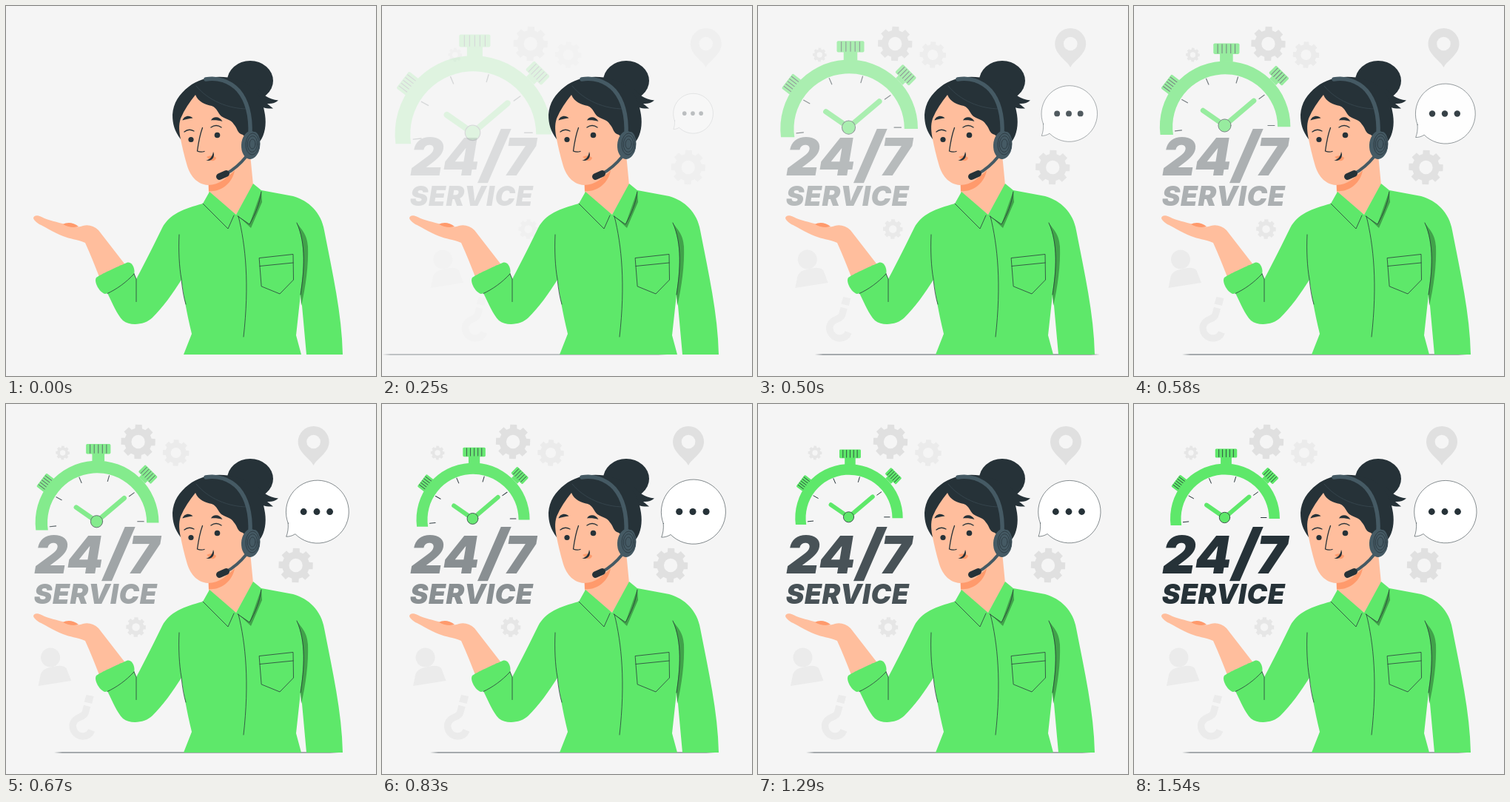
Write an HTML page with a canvas that moves like this. It is 500 by 500 pixels and loops after 1620 ms.

```html
<!DOCTYPE html>
<html lang="en">
<head>
<meta charset="utf-8">
<title>24/7 service</title>
<style>
html, body { margin: 0; width: 100%; height: 100%; overflow: hidden; background: #f5f5f5; }
canvas { display: block; }
</style>
</head>
<body>
<canvas id="stage" width="500" height="500"></canvas>
<script>
const LOOP = 1620, TAU = Math.PI * 2;
const BG = '#f5f5f5', GREEN = '#5ee86a', SHADE = '#41a24a', DARK = '#263238',
  STEEL = '#455a64', SKIN = '#ffbe9d', BLUSH = '#ff9a6c', GREY = '#e0e0e0', PALE = '#ebebeb';

const stage = document.getElementById('stage').getContext('2d');
const makeLayer = () => {
  const canvas = document.createElement('canvas');
  canvas.width = canvas.height = 500;
  return canvas.getContext('2d');
};
const layer = makeLayer(), portrait = makeLayer();
let ctx = stage;

const clamp = v => Math.max(0, Math.min(1, v));

// Cubic bezier timing with a soft overshoot.
function ease(x) {
  x = clamp(x);
  const curve = (u, a, b) => 3 * (1 - u) ** 2 * u * a + 3 * (1 - u) * u * u * b + u ** 3;
  let lo = 0, hi = 1;
  for (let i = 0; i < 24; i++) {
    const mid = (lo + hi) / 2;
    if (curve(mid, 0.36, 0.5) < x) lo = mid; else hi = mid;
  }
  return curve((lo + hi) / 2, -0.01, 1.38);
}

function fill(d, color) {
  ctx.fillStyle = color;
  ctx.fill(new Path2D(d));
}

function stroke(d, color = DARK, width = 0.75, cap = 'round') {
  ctx.strokeStyle = color;
  ctx.lineWidth = width;
  ctx.lineCap = cap;
  ctx.lineJoin = 'round';
  ctx.stroke(new Path2D(d));
}

function oval(x, y, rx, ry, color, turn = 0) {
  ctx.beginPath();
  ctx.ellipse(x, y, rx, ry, turn, 0, TAU);
  ctx.fillStyle = color;
  ctx.fill();
}

const dot = (x, y, r, color) => oval(x, y, r, r, color);

// Paints a group on its own layer so that overlaps fade as one.
function fadeGroup(alpha, paint) {
  if (alpha <= 0) return;
  ctx = layer;
  ctx.clearRect(0, 0, 500, 500);
  ctx.save();
  paint();
  ctx.restore();
  ctx = stage;
  ctx.globalAlpha = clamp(alpha);
  ctx.drawImage(layer.canvas, 0, 0);
  ctx.globalAlpha = 1;
}

function scaleAbout(x, y, s) {
  ctx.translate(x, y);
  ctx.scale(s, s);
  ctx.translate(-x, -y);
}

function gear(x, y, r, color, turn = 0.03) {
  ctx.beginPath();
  for (let i = 0; i < 8; i++) {
    const a = turn + i * TAU / 8;
    for (const [da, k] of [[-0.26, 0.79], [-0.19, 1], [0.19, 1], [0.26, 0.79]])
      ctx.lineTo(x + r * k * Math.cos(a + da), y + r * k * Math.sin(a + da));
  }
  ctx.closePath();
  ctx.moveTo(x + r * 0.39, y);
  ctx.arc(x, y, r * 0.39, 0, TAU);
  ctx.fillStyle = color;
  ctx.fill('evenodd');
}

function drawIcons() {
  gear(179, 51, 23.5, GREY);
  gear(230, 66, 18, PALE);
  gear(77, 66, 9.5, '#e6e6e6');
  gear(392, 218, 23.5, GREY);
  gear(176, 301.5, 13.5, '#e6e6e6');
  fill('M416 83C411 73 395 66 395 51A21 21 0 0 1 437 51C437 66 421 73 416 83Z', GREY);
  dot(416, 51, 9.3, BG);
  dot(60.5, 342.5, 13, PALE);
  fill('M44 381L47 366C49 359 55 357 60 356C68 354 77 352 82 357L88.5 374Z', PALE);
  fill('M109 393L119 395L116.500 405L106 402.500Z', PALE);
  stroke('M110 408L107.500 417C106 423 99 422 94 427C86 435 93 449 104 449C110 449 114 446 116 441', PALE, 9.5, 'butt');
}

function drawBubble() {
  const d = 'M381.500 161A42.200 42.200 0 1 1 391 175.500C387 178 383 179 379 179C381 174 382 168 381.500 161Z';
  fill(d, '#fff');
  stroke(d, DARK, 0.55);
  for (const x of [402.3, 420, 437.5]) dot(x, 145.5, 4.4, DARK);
}

function crown(x, y, w, h, turn, stem = 0) {
  ctx.save();
  ctx.translate(x, y);
  ctx.rotate(turn);
  ctx.fillStyle = GREEN;
  ctx.fillRect(-w / 4, h / 2 - 1, w / 2, stem + 1);
  ctx.beginPath();
  ctx.roundRect(-w / 2, -h / 2, w, h, 1.5);
  ctx.fill();
  for (let i = -2; i <= 2; i++) stroke(`M${i * w / 6} ${-h / 2 + 1}V${h / 2 - 1}`, DARK, 0.8);
  ctx.restore();
}

function drawStopwatch() {
  crown(124.5, 66.5, 29.5, 12, 0, 9);
  crown(61, 107, 20, 12, -0.92, 2);
  crown(184, 97, 21, 12, 0.78, 4);
  fill('M49.600 164A74 74 0 1 1 197 155H182.500A59.500 59.500 0 1 0 64.200 164Z', GREEN);
  for (let i = 0; i < 6; i++) {
    const a = -i * 0.65, c = Math.cos(a), s = Math.sin(a);
    stroke(`M${122.5 + 49 * c} ${153.5 + 50 * s}L${122.5 + 56.5 * c} ${153.5 + 57 * s}`, DARK, 1);
  }
  stroke('M98 136.500L122.500 153.500L155.500 125.500', GREEN, 5.8);
  dot(122.5, 153.5, 7.2, GREEN);
  ctx.beginPath();
  ctx.arc(122.5, 153.5, 7.2, 0, TAU);
  ctx.strokeStyle = DARK;
  ctx.lineWidth = 0.8;
  ctx.stroke();
}

function label(text, x, y, size, spacing = 0) {
  ctx.font = `italic 900 ${size}px Inter, "Open Sans", sans-serif`;
  ctx.letterSpacing = spacing + 'px';
  ctx.textAlign = 'center';
  ctx.fillStyle = DARK;
  ctx.fillText(text, x, y);
}

function drawText() {
  label('24', 85, 228.5, 70);
  label('/', 151, 230, 84);
  label('7', 186, 228.5, 70);
  label('SERVICE', 121, 270, 37, 0.6);
}

function drawArm() {
  fill('M37 287C37 283 42 282 48 285C57 290 70 292 80 295C90 300 98 299 104 297C111 295 119 297 125 303L163 352L126 366C120 351 114 335 107 320C95 315 87 315 77 311C64 306 52 298 45 295C41 292 38 290 37 287Z', SKIN);
  fill('M77 295C82 292 91 292 98 298C92 300 84 299 77 295Z', BLUSH);
}

function drawShirt() {
  fill('M266 267C240 274 221 281 211 300C200 322 190 343 176 369L172 358L135 380L137 388C144 402 150 417 158 425C168 433 188 431 198 421C212 407 225 389 237 370C240 390 244 414 251 443L240 471H399L392 445L398 390L400 405L406 471H455C454 416 441 360 430 303C426 279 409 263 388 257L345 249L334 240L311 282L275 251Z', GREEN);
  fill('M122 367C127 363 151 352 163 347C171 344 175 357 173 362C165 374 145 387 134 389C127 388 118 373 122 367Z', GREEN);
  fill('M393 293C399 302 407 308 408 325C409 350 405 380 399 405L398 388C403 356 405 321 393 293Z', SHADE);
  fill('M345 250L346 265L331 300L314 284L329 295Z', SHADE);
  stroke('M266 267L300 301L308 283');
  stroke('M313 284L329 295C337 281 343 267 345 251');
  stroke('M314 284C324 324 329 376 321 447');
  stroke('M342.500 340.500L388 335.500L388.500 370L370 389L345.500 379Z');
  stroke('M343 351.500L388 347');
  stroke('M234 309C233 331 234 352 237 369Q239 390 243 403');
  stroke('M176 399.500V369L173 362');
  stroke('M173 362C162 374 149 383 137 388.500');
  stroke('M393 293C406 322 403 358 398 390');
}

function drawHead() {
  oval(330, 101, 31, 27, DARK);
  fill('M341 112C348 120 354 126 368 127.500C364 131 359 132.500 353 132L361 138.500C352 139 345 138 338 130Z', DARK);
  fill('M236 180C228 169 225 160 225 147C226 131 234 119 247 109C262 97 287 92 311 99C335 105 347 123 350 147C352 160 350 174 343 183L322 205L280 210Z', DARK);
  fill('M273 236L274 252L311 282L334 242L328 180L300 205Z', SKIN);
  fill('M274 240C286 239 299 233 309 222C306 241 288 252 274 250Z', BLUSH);
  fill('M236 180C234 170 233 161 236 152C241 140 248 130 256 120C260 130 269 133 278 135C286 138 286 145 291 149C298 154 304 153 308 160C313 165 312 172 320 174L328 181C327 200 317 209 310 217C301 232 288 242 273 242C257 241 248 228 244 213C241 203 238 190 236 180Z', SKIN);
  stroke('M257 108C273 128 301 139 326 139', '#37474f', 0.9);
}

function drawFace() {
  fill('M238.500 154.500C240 148.500 248 146.500 252.500 151.500C247 152 243 153 238.500 154.500Z', DARK);
  fill('M277 154.500C280 148.500 289 149 292.500 156C288 154.500 282 154 277 154.500Z', DARK);
  stroke('M241 170Q247 165 254 169', DARK, 1.3);
  stroke('M277 164Q284 159 291 164', DARK, 1.3);
  dot(250, 180.5, 3.6, DARK);
  dot(285.5, 174.5, 3.8, DARK);
  stroke('M265.500 164.500C262 174 260 185 258.500 196Q263 198 268 196.500', DARK, 1.3);
  fill('M271 204Q278 200 284 205Q283 210 277 209Z', BLUSH);
  fill('M270 208.500C275 208 279 204 280 197C283 203 279 211 270 208.500Z', DARK);
}

function drawHeadset() {
  stroke('M270 99C285 96 302 101 314 114C326 128 331 149 330 174', STEEL, 5.5);
  stroke('M325 203C317 213 308 221 297 227', STEEL, 4);
  stroke('M288.500 230.500L297.500 226.500', DARK, 9);
  oval(330.5, 188, 12.5, 19, STEEL, 0.05);
  oval(335.5, 186, 8, 16, STEEL);
  ctx.strokeStyle = DARK;
  ctx.lineWidth = 0.7;
  for (const k of [0.45, 0.75, 1]) {
    ctx.beginPath();
    ctx.ellipse(333, 186.5, 9 * k, 14.5 * k, 0.05, 0, TAU);
    ctx.stroke();
  }
}

ctx = portrait;
[drawArm, drawHead, drawShirt, drawFace, drawHeadset].forEach(paint => paint());
ctx = stage;

function render(t) {
  ctx.fillStyle = BG;
  ctx.fillRect(0, 0, 500, 500);
  if (t >= 130) {
    const phase = (t + 25) / 1000;
    const quick = ease(phase), slow = ease((t + 25) / 1390), slide = ease(phase / 0.6);
    fadeGroup(quick, () => { ctx.translate(30 * (1 - quick), 0); drawIcons(); });
    fadeGroup(slide, () => {
      ctx.translate(-193 * (1 - slide), 0);
      fill('M65 471L76 470.200H438L450 471L438 471.800H76Z', '#8a9094');
    });
    fadeGroup(quick, () => { scaleAbout(420, 144.5, 0.5 + 0.5 * quick); drawBubble(); });
    fadeGroup(slow, () => { scaleAbout(122.5, 112, 1.5 - 0.5 * slow); drawStopwatch(); });
    fadeGroup((t - 70) / 1470, drawText);
  }
  ctx.drawImage(portrait.canvas, 0, 0);
}

const start = performance.now();
function tick() {
  render((performance.now() - start) % LOOP);
  requestAnimationFrame(tick);
}
tick();
</script>
</body>
</html>
```
